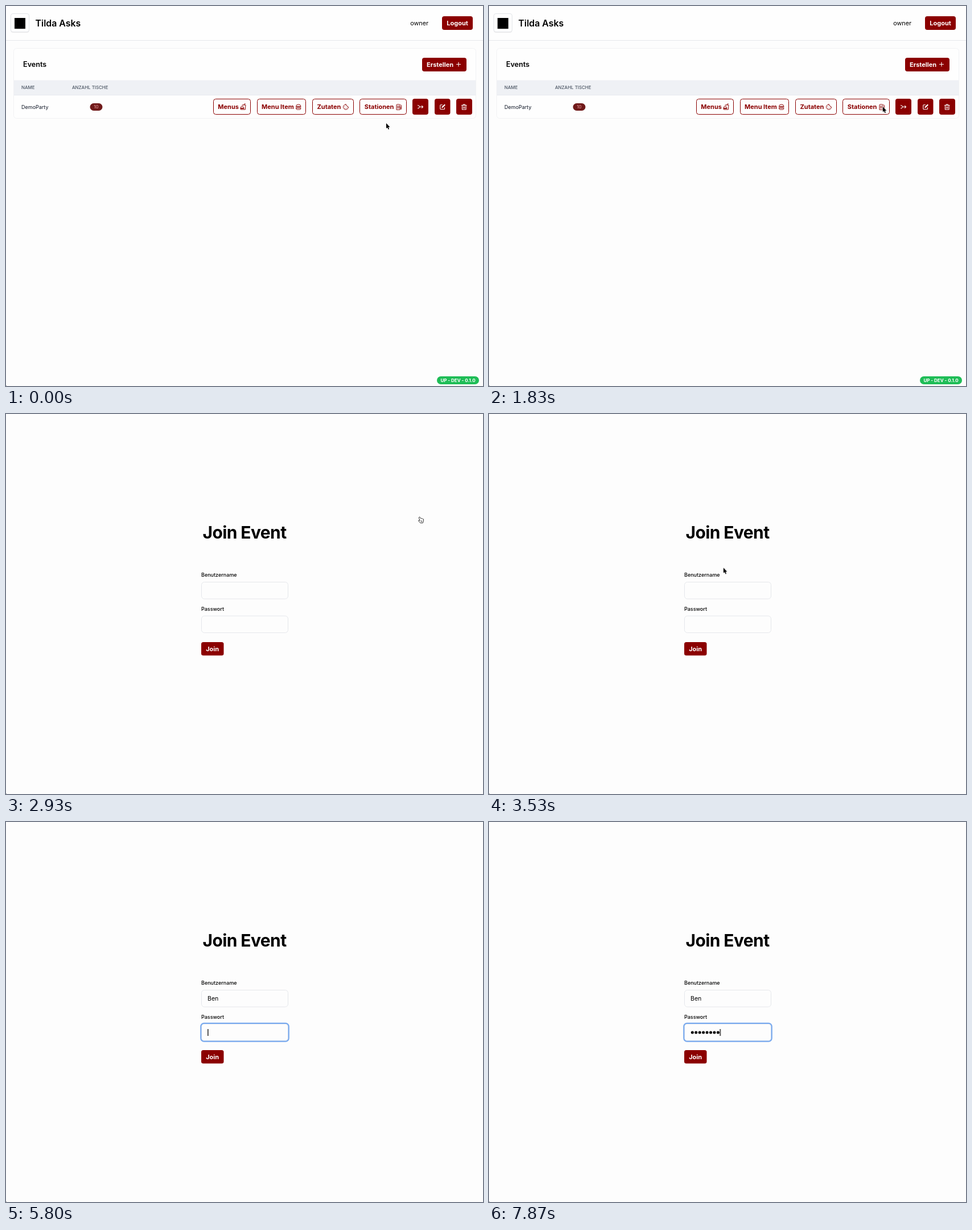
Animation, 838 px wide and 668 px high, one loop 8000 ms. Source, as an HTML page:

```html
<!DOCTYPE html>
<html lang="de">
<head>
<meta charset="utf-8">
<title>Join Event</title>
<style>
  html, body { margin: 0; width: 100%; height: 100%; overflow: hidden; background: #fdfdfd; }
  svg { display: block; width: 838px; height: 668px; font-family: Inter, sans-serif; font-optical-sizing: none; }
  .btn { fill: #8b0000; }
  .outline rect { fill: #fefefe; stroke: #8b0000; }
  .outline text { fill: #8b0000; }
  .bold { font-size: 11px; font-weight: 700; }
  .white { fill: #fff; }
  .head { font-size: 7.9px; font-weight: 500; fill: #4b5563; }
  .label { font-size: 9px; font-weight: 500; }
  .field { fill: #fdfdfd; stroke: #e5e7eb; }
  .ring { fill: none; stroke: #78a9ee; stroke-width: 2.2; }
  .icon { fill: none; stroke: #8b0000; stroke-width: .95; stroke-linecap: round; stroke-linejoin: round; }
  .icon.light { stroke: #fff; stroke-width: 1.1; }

  .step, .move, .blink { animation: 8s linear infinite; }
  .step { animation-timing-function: step-end; }
  .move { animation-timing-function: ease-in-out; }
  .list { animation-name: list; }
  .login { animation-name: login; }
  .focus1 { animation-name: focus1; }
  .focus2 { animation-name: focus2; }
  .type1 { animation-name: type1; }
  .type2 { animation-name: type2; }
  .blink { animation-name: blink; }
  .pointer { animation-name: pointer; }
  .arrow { animation-name: arrow; }
  .hand { animation-name: hand; }
  .beam { animation-name: beam; }

  @keyframes list { 0% { opacity: 1 } 32.875%, 100% { opacity: 0 } }
  @keyframes login { 0% { opacity: 0 } 32.875%, 100% { opacity: 1 } }
  @keyframes focus1 { 0% { opacity: 0 } 49.625% { opacity: 1 } 65.875%, 100% { opacity: 0 } }
  @keyframes focus2 { 0% { opacity: 0 } 65.875%, 100% { opacity: 1 } }
  @keyframes type1 {
    0% { transform: none }
    55% { transform: translateX(7.4px) }
    57.125% { transform: translateX(14px) }
    60.375%, 100% { transform: translateX(20.8px) }
  }
  @keyframes type2 {
    0% { transform: none }
    78.75% { transform: translateX(6.4px) }
    80.875% { transform: translateX(12.85px) }
    85.375% { transform: translateX(19.3px) }
    87.125% { transform: translateX(25.7px) }
    91.25% { transform: translateX(32.1px) }
    92.875% { transform: translateX(38.6px) }
    96.625% { transform: translateX(45px) }
    98.375%, 100% { transform: translateX(51.4px) }
  }
  @keyframes blink {
    0%, 72.5% { opacity: 1 }
    75.375%, 77.125% { opacity: 0 }
    78.75%, 100% { opacity: 1 }
  }
  @keyframes pointer {
    0%, .375% { transform: translate(668px, 206px) }
    15% { transform: translate(658px, 177px) }
    30%, 30.875% { transform: translate(720px, 177px) }
    32.5%, 37.125% { transform: translate(727px, 180px) }
    42% { transform: translate(480px, 240px) }
    46.25% { transform: translate(345px, 300px) }
    49.5%, 100% { transform: translate(367px, 304.5px) }
  }
  @keyframes arrow { 0% { opacity: 1 } 31.625% { opacity: 0 } 37.125% { opacity: 1 } 46.25%, 100% { opacity: 0 } }
  @keyframes hand { 0% { opacity: 0 } 31.625% { opacity: 1 } 37.125%, 100% { opacity: 0 } }
  @keyframes beam { 0% { opacity: 0 } 46.25% { opacity: 1 } 55%, 100% { opacity: 0 } }
</style>
</head>
<body>
<svg viewBox="0 0 838 668">
  <rect width="838" height="668" fill="#fdfdfd"/>

  <g class="step list">
    <rect width="838" height="60" fill="#fefefe"/>
    <path d="M0 60.5H838" stroke="#e5e7eb"/>
    <rect x="8.5" y="14.2" width="32" height="32.6" rx="3.5" fill="#e9e9e9"/>
    <rect x="8.5" y="13.5" width="32" height="32" rx="3.5" fill="#fff" stroke="#e2e4e8"/>
    <rect x="15" y="21" width="19" height="19"/>
    <text x="51.5" y="36" font-size="15.9" font-weight="600">Tilda Asks</text>
    <text x="742" y="34" font-size="10.8" text-anchor="end">owner</text>
    <rect class="btn" x="766" y="18" width="54" height="24" rx="4"/>
    <text class="bold white" x="793" y="34" text-anchor="middle">Logout</text>

    <rect x="13.5" y="74.5" width="812" height="123" rx="5" fill="#fefefe" stroke="#f1f2f4"/>
    <text x="30" y="107" font-size="12.6" font-weight="600">Events</text>
    <rect class="btn" x="731" y="91" width="78" height="24" rx="4"/>
    <text class="bold white" x="739" y="106.6">Erstellen</text>
    <path class="icon light" d="M791.5 102.5H798.5M795 99V106"/>

    <rect x="14" y="130.500" width="811" height="26.5" fill="#eff1f5"/>
    <path d="M14 156.700H825" stroke="#e6e8ec" stroke-width=".7"/>
    <text class="head" x="27" y="146">NAME</text>
    <text class="head" x="116" y="146">ANZAHL TISCHE</text>
    <text x="27" y="180.500" font-size="9" fill="#111827">DemoParty</text>
    <rect x="147.500" y="171" width="22" height="13" rx="6.5" fill="#701a1a"/>
    <text x="158.500" y="180.400" font-size="8" fill="#f0a0a0" text-anchor="middle">10</text>

    <g class="outline bold">
      <rect x="364.500" y="163.500" width="65" height="27" rx="4"/>
      <text x="372.300" y="181.400">Menus</text>
      <rect x="441.500" y="163.500" width="85" height="27" rx="4"/>
      <text x="449" y="181.400">Menu Item</text>
      <rect x="538.500" y="163.500" width="72" height="27" rx="4"/>
      <text x="546.500" y="181.400">Zutaten</text>
      <rect x="621.500" y="163.500" width="82" height="27" rx="4"/>
      <text x="629.800" y="181.400">Stationen</text>
    </g>
    <g class="icon">
      <path d="M415 175V174H421L420.300 182H412.500L411.800 180.500H418M411.800 179Q412 176.500 414.800 176.500T418 179ZM418 174L418.800 172H420.500"/>
      <path d="M509.500 176Q509.800 173 513.800 173T518 176ZM509.500 177.800H518M509.500 179.600H518Q518 182 516 182H511.500Q509.500 182 509.500 179.600Z"/>
      <path d="M597 173A4.500 4.500 0 1 0 601.500 177.500Q599.500 177.800 599.300 175.500Q597 175.500 597 173ZM595 176.500h.1M595.500 179.500h.1M598.500 179.500h.1"/>
      <path d="M686 182V174Q686 173 687 173H691Q692 173 692 174V182ZM688 175.500V180M690 175.500V180M692 177H693V181Q694.500 182.500 694.700 180.500V175L693.200 173.500"/>
    </g>

    <g class="btn">
      <rect x="714" y="163" width="28" height="28" rx="4"/>
      <rect x="753" y="163" width="27.500" height="28" rx="4"/>
      <rect x="791" y="163" width="28" height="28" rx="4"/>
    </g>
    <g class="icon light">
      <path d="M723.500 174.500Q725.500 174.800 727 177.300H732.500M723.500 180Q725.500 179.700 727 177.300M730.500 175.300L732.600 177.300L730.500 179.300"/>
      <path d="M766.500 173.700H763.800Q762.800 173.700 762.800 174.700V180.500Q762.800 181.500 763.800 181.500H769.500Q770.500 181.500 770.500 180.500V178.500"/>
      <path d="M766.500 178L770.500 174" stroke-width="2.400"/>
      <path d="M800.500 174.500H809M803.200 174.300V173H806.300V174.300M801.400 174.800V182H808.100V174.800M803.700 176.800V180M805.800 176.800V180"/>
    </g>

    <rect x="757" y="651" width="74" height="14" rx="7" fill="#1fbd57"/>
    <text class="white" x="794" y="660.700" font-size="8" font-weight="700" text-anchor="middle">UP - DEV - 0.1.0</text>
  </g>

  <g class="step login">
    <text x="419" y="219" font-size="30" font-weight="700" letter-spacing="-.6" text-anchor="middle">Join Event</text>
    <text class="label" x="343" y="286.300">Benutzername</text>
    <text class="label" x="343" y="345.800">Passwort</text>
    <rect class="field" x="343.500" y="295.500" width="152" height="29.500" rx="5"/>
    <rect class="field" x="343.500" y="355" width="152" height="29.500" rx="5"/>
    <rect class="btn" x="343" y="401" width="39.500" height="23.500" rx="3.500"/>
    <text class="bold white" x="362.700" y="416.600" text-anchor="middle">Join</text>

    <text x="354" y="314" font-size="10.600">Ben</text>
    <path d="M357.300 370H403" stroke="#000" stroke-width="5" stroke-linecap="round" stroke-dasharray="0 6.440"/>

    <g class="step type1">
      <rect x="354" y="300" width="26" height="20" fill="#fdfdfd"/>
      <rect class="step focus1" x="354" y="304" width="1.400" height="12"/>
    </g>
    <g class="step type2">
      <rect x="354" y="362" width="56" height="16" fill="#fdfdfd"/>
      <g class="step focus2"><rect class="blink" x="354.200" y="364" width="1.300" height="12"/></g>
    </g>
    <rect class="ring step focus1" x="342.300" y="294.300" width="154.400" height="31.800" rx="5.500"/>
    <rect class="ring step focus2" x="342.300" y="353.800" width="154.400" height="31.800" rx="5.500"/>
  </g>

  <path d="M0 666.500V668H1.500Z" fill="#888"/>

  <g class="move pointer">
    <path class="step arrow" d="M0 0V9.300L2.100 7.400L3.600 10.900L5.200 10.200L3.700 6.900H6.500Z" stroke="#fff" stroke-width="1.200" paint-order="stroke"/>
    <path class="step hand" d="M-1.500 1.700Q-1 .4 .2 1.200L2 4Q2.700 3 3.600 3.900Q4.700 3.300 5.200 4.500Q6.600 4.300 6.600 6L6.200 9L5.300 11.500H.8L-2.200 8Q-2.700 6.600-1.300 6.700L.2 7.500L-1.500 3ZM2.200 7.500V9.500M3.700 7.500V9.500" fill="#fff" stroke="#222" stroke-width=".9" stroke-linejoin="round"/>
    <path class="step beam" d="M-2.500-5Q0-5 0-3.500Q0-5 2.500-5M0-3.500V3.500M-2.500 5Q0 5 0 3.500Q0 5 2.500 5M-1.200 1H1.200" fill="none" stroke="#111"/>
  </g>
</svg>
</body>
</html>
```
